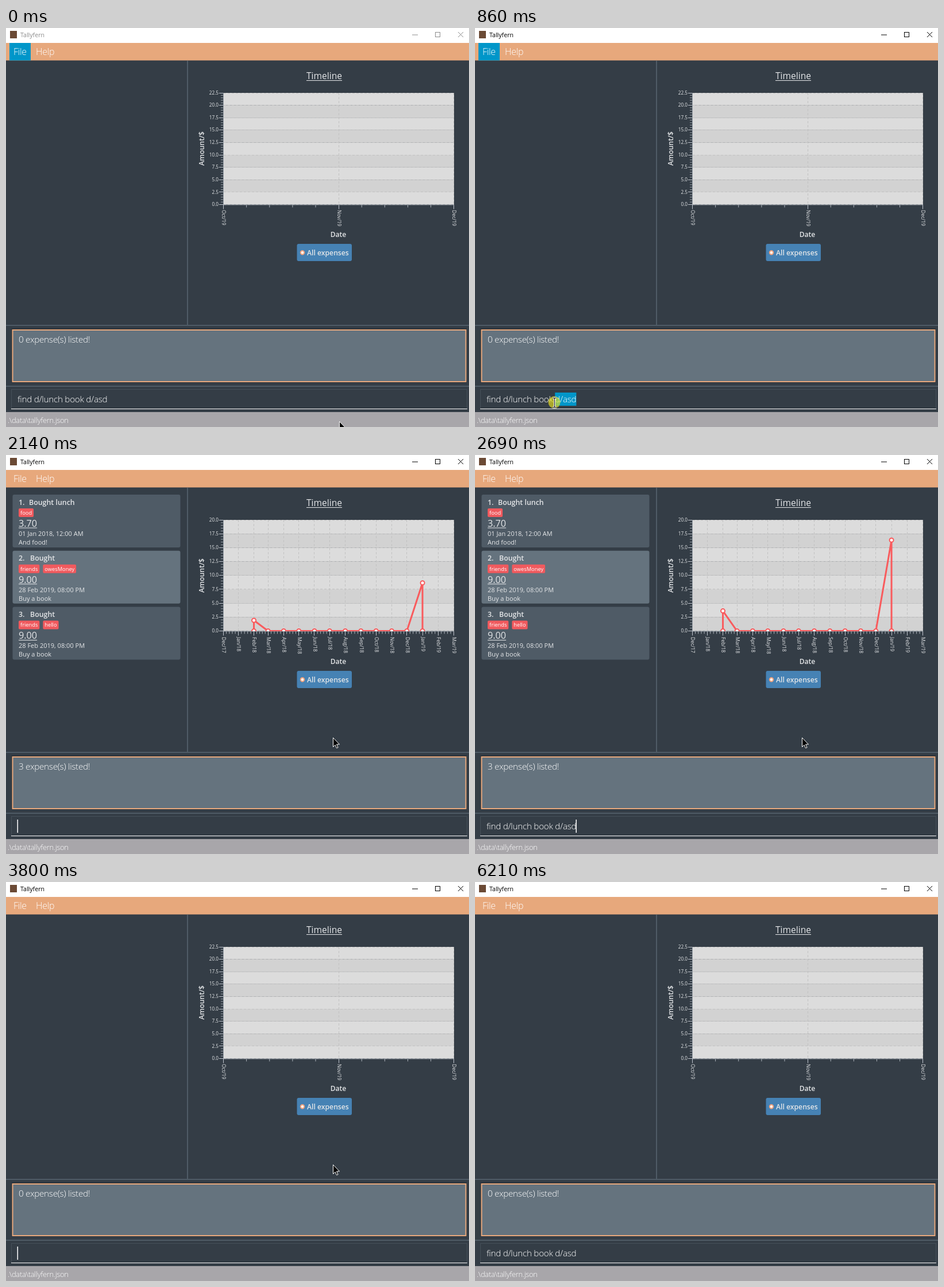
An HTML page with a canvas for the animation above (6650 ms loop, 806 px wide and 695 px high).

```html
<!DOCTYPE html>
<html lang="en">
<head>
<meta charset="utf-8">
<title>Tallyfern</title>
<style>
  html, body { margin: 0; width: 100%; height: 100%; overflow: hidden; background: #343d46; }
  canvas { display: block; }
</style>
</head>
<body>
<canvas id="stage" width="806" height="695"></canvas>
<script>
const ctx = document.getElementById('stage').getContext('2d');
const LOOP = 6650;
const STEPS = [0, 100, 207, 313, 420, 527, 633, 740, 860, 1080, 1185, 1290, 1650, 2140, 2250, 2360,
  2470, 2580, 2690, 2810, 3250, 3700, 3800, 4350, 4660, 5110, 5660, 5990, 6100, 6210];
const PATH = [[0, 580, 685], [527, 176, 652], [740, 138, 652], [975, 138, 652], [1290, 569, 492],
  [5880, 569, 492], [6100, 733, 680], [LOOP, 733, 680]];
const SHORT = 'find d/lunch book', FULL = SHORT + ' d/asd';
const INK = '#e4e6e8', DARK = '#343d46', MID = '#4f5b66', SLATE = '#65737e';
const ORANGE = '#e7a87c', RED = '#f95b5d', BLUE = '#0096c9';
const PLOT = { left: 379, right: 780, top: 113 };

function rect(x, y, w, h, color, radius = 0) {
  ctx.fillStyle = color;
  ctx.beginPath();
  ctx.roundRect(x, y, w, h, radius);
  ctx.fill();
}

function frame(x, y, w, h, color, width = 1) {
  ctx.strokeStyle = color;
  ctx.lineWidth = width;
  ctx.strokeRect(x, y, w, h);
}

function line(points, color, width = 1, dash = []) {
  ctx.strokeStyle = color;
  ctx.lineWidth = width;
  ctx.setLineDash(dash);
  ctx.beginPath();
  points.forEach(([x, y]) => ctx.lineTo(x, y));
  ctx.stroke();
  ctx.setLineDash([]);
}

function dot(x, y, r, fill, stroke, width = 2) {
  ctx.beginPath();
  ctx.arc(x, y, r, 0, 7);
  ctx.fillStyle = fill;
  ctx.fill();
  if (!stroke) return;
  ctx.strokeStyle = stroke;
  ctx.lineWidth = width;
  ctx.stroke();
}

function setFont(size, weight) {
  ctx.font = `${weight} ${size}px "Open Sans", "Noto Sans", sans-serif`;
  ctx.letterSpacing = weight === 300 ? '-0.3px' : '0px';
}

// Draws text and returns its width.
function text(str, x, y, size, { weight = 400, color = INK, align = 'left', base = 'alphabetic', turn = 0 } = {}) {
  setFont(size, weight);
  ctx.save();
  ctx.translate(x, y);
  ctx.rotate(turn * Math.PI / 2);
  ctx.textAlign = align;
  ctx.textBaseline = base;
  ctx.fillStyle = color;
  ctx.fillText(str, 0, 0);
  ctx.restore();
  return ctx.measureText(str).width;
}

function drawTitleBar(active) {
  const color = active ? '#000' : '#8c8c8c';
  rect(0, 0, 806, 26, '#fff');
  rect(7, 5, 12, 13, '#6b4a35');
  text('Tallyfern', 25, 16, 10.6, { color });
  rect(707, 11.5, 10, 1, color);
  frame(747.5, 7.5, 8, 8, color);
  line([[787, 7], [796, 16]], color);
  line([[796, 7], [787, 16]], color);
}

function drawShell(t) {
  rect(0, 0, 806, 695, DARK);
  drawTitleBar(t >= 527);
  rect(0, 26, 806, 30.5, ORANGE);
  if (t < 1080) rect(6, 26, 37, 30.5, BLUE);
  text('File', 13, 46.5, 16, { weight: 300, color: '#fff' });
  text('Help', 52, 46.5, 16, { weight: 300, color: '#fff' });

  rect(315, 57, 2, 461, MID);
  rect(0, 517, 806, 2, MID);
  rect(0, 623, 806, 2, MID);
  rect(9, 523, 793, 95, '#2d353d');
  rect(11, 525, 790, 92, SLATE);
  frame(11.5, 526, 789, 90, ORANGE, 2);
  frame(9.5, 629.5, 793, 34, '#45505a');
  rect(9, 663, 794, 1, '#fff');
  rect(0, 669, 806, 26, '#a8a6aa');
  text('.\\data\\tallyfern.json', 3, 688, 13, { weight: 300, color: '#fff' });
}

function drawCard(index, name, nameX, tags, amount, date, note) {
  const y = 69 + index * 97.7;
  rect(11.5, y, 292, 92, index % 2 ? SLATE : MID, 3);
  text(`${index + 1}.`, 22, y + 17.5, 12.4, { weight: 600 });
  text(name, nameX, y + 17.5, 12.4, { weight: 600 });
  let x = 22;
  for (const tag of tags) {
    setFont(9.3, 400);
    const width = ctx.measureText(tag).width + 6;
    rect(x, y + 24, width, 15, '#f05a5e', 2);
    text(tag, x + 3, y + 35, 9.3, { color: '#fff' });
    x += width + 6;
  }
  rect(22, y + 57.5, text(amount, 22, y + 56, 16.2), 1, INK);
  text(date, 22, y + 72, 11);
  text(note, 22, y + 87, 11);
}

function drawCards() {
  drawCard(0, 'Bought lunch', 40, ['food'], '3.70', '01 Jan 2018, 12:00 AM', 'And food!');
  drawCard(1, 'Bought', 42, ['friends', 'owesMoney'], '9.00', '28 Feb 2019, 08:00 PM', 'Buy a book');
  drawCard(2, 'Bought', 42, ['friends', 'hello'], '9.00', '28 Feb 2019, 08:00 PM', 'Buy a book');
}

// Month 0 is January 2018.
function monthTick(month) {
  const first = new Date(Date.UTC(2018, month, 1));
  const days = (first - Date.UTC(2018, 0, 1)) / 864e5;
  const name = first.toLocaleString('en-US', { month: 'short', timeZone: 'UTC' });
  const x = month < 0 ? 378.5 : month > 13 ? 779.5 : 404.3 + days * 0.8788;
  return { x, label: `${name}/${first.getUTCFullYear() % 100}` };
}

function drawAxes(rows, bottom, ticks) {
  const { left, right, top } = PLOT, step = (bottom - top) / rows, grid = '#c2c2c2';
  for (let i = 0; i < rows; i++) {
    rect(left, top + i * step, right - left, step, i % 2 ? '#d2d2d2' : '#dcdcdc');
  }
  for (let i = 0; i <= rows; i++) {
    const y = top + i * step, snapped = Math.floor(y) + 0.5;
    line([[left, snapped], [right, snapped]], grid, 1, [4, 3]);
    line([[371, snapped], [left, snapped]], '#c0c5ce');
    text(((rows - i) * 2.5).toFixed(1), 370, y + 0.5, 8.2, { align: 'right', base: 'middle' });
    for (let j = 1; j < 5 && i < rows; j++) {
      line([[374, y + j * step / 5], [left, y + j * step / 5]], '#9aa1a9');
    }
  }
  ticks.forEach(({ x, label }, i) => {
    const snapped = Math.floor(x) + 0.5;
    if (i) line([[snapped, top], [snapped, bottom]], grid, 1, [4, 3]);
    line([[snapped, bottom], [snapped, bottom + 8]], '#c0c5ce');
    text(label, x, 317, 8.5, { base: 'middle', turn: 1 });
    const next = ticks[i + 1];
    for (let j = 1; next && j < 5; j++) {
      const minor = x + (next.x - x) * j / 5;
      line([[minor, bottom], [minor, bottom + 5]], '#b0b6be');
    }
  });
  line([[378.5, top], [378.5, bottom]], '#9aa1a9');
  line([[left, bottom + 0.5], [right, bottom + 0.5]], '#9aa1a9');
}

function drawSeries(t, ticks) {
  const zero = 306.5, settled = t >= 2810;
  const grow = Math.min(1, 0.48 + 0.52 * (t - 2140) / 670);
  const first = zero - 38.5 * grow, last = zero - 174.5 * grow;
  const flat = ticks.slice(2, 14).map(({ x }) => [x, zero]);
  const points = settled
    ? [[ticks[1].x, first], ...flat, [ticks[14].x, last]]
    : [flat[0], [flat[0][0], first], ...flat.slice(1, -1), [flat[11][0], last], flat[11]];
  ctx.save();
  ctx.beginPath();
  ctx.rect(PLOT.left, PLOT.top, PLOT.right - PLOT.left, 194);
  ctx.clip();
  ctx.lineJoin = 'round';
  line(points, RED, 3);
  points.forEach(([x, y]) => dot(x, y, 3.5, '#fff', RED));
  ctx.restore();
}

function drawChart(t, hasData) {
  const width = text('Timeline', 554, 89, 15.6, { align: 'center' });
  rect(554 - width / 2, 91, width, 1, INK);
  text('Amount/$', 345, 210, 12.3, { weight: 600, align: 'center', turn: -1 });
  text('Date', 578.5, 363.5, 12.1, { weight: 600, align: 'center' });

  if (hasData) {
    const ticks = Array.from({ length: 16 }, (_, i) => monthTick(i - 1));
    drawAxes(8, 306.5, ticks);
    drawSeries(t, ticks);
  } else {
    const ticks = ['Oct/19', 'Nov/19', 'Dec/19'].map((label, i) => ({ label, x: 378.5 + i * 200.6 }));
    drawAxes(9, 307.5, ticks);
  }

  rect(506.5, 376, 95.5, 30, '#4682b4', 3);
  dot(516, 391.3, 3.2, '#fff', '#f3a27c');
  text('All expenses', 524, 395.5, 12.2, { weight: 600 });
}

function commandAt(t) {
  if (t < 1650) return FULL;
  if (t < 2140) return SHORT;
  if (t < 2580) return '';
  if (t < 2690) return SHORT;
  return t < 3800 || t >= 4660 ? FULL : '';
}

function caretVisible(t) {
  return [[1650, 3250], [3700, 4350], [4660, 5110], [5660, 6210]].some(([from, to]) => t >= from && t < to);
}

function drawCommand(t, pointer) {
  const command = commandAt(t), x = 20;
  setFont(15.3, 300);
  const end = x + ctx.measureText(command).width;
  if (t >= 527 && t < 1650) {
    const wordStart = x + ctx.measureText(SHORT + ' ').width;
    const start = t < 740 ? Math.max(wordStart, pointer.x) : wordStart;
    if (start < end) rect(start, 635, end - start, 23, BLUE);
  }
  text(command, x, 652, 15.3, { weight: 300, color: '#fff' });
  if (caretVisible(t)) rect(Math.round(end) - 0.5, 635, 1.5, 23, '#fff');
}

function pointerAt(t) {
  const i = PATH.findIndex(([time]) => time > t);
  const [t0, x0, y0] = PATH[i - 1], [t1, x1, y1] = PATH[i];
  const k = (t - t0) / (t1 - t0);
  return { x: x0 + (x1 - x0) * k, y: y0 + (y1 - y0) * k };
}

function drawPointer(t, { x, y }) {
  if (t >= 6210) return;
  const pressed = t >= 527 && t < 1080 && t !== 740;
  if (pressed) dot(x, y, 10.5, 'rgba(235, 225, 30, 0.65)');
  ctx.save();
  ctx.translate(Math.round(x), Math.round(y));
  if (y > 629 && y < 664) {
    for (const [color, width] of [['#fff', 3], ['#000', 1]]) {
      line([[0.5, -7], [0.5, 8]], color, width);
      line([[-3, -7.5], [4, -7.5]], color, width);
      line([[-3, 8.5], [4, 8.5]], color, width);
    }
  } else {
    const arrow = new Path2D('M.5 .5V16.5L4 13L6.5 18.5L9 17.5L6.5 12H11.5Z');
    ctx.fillStyle = '#000';
    ctx.fill(arrow);
    ctx.strokeStyle = '#fff';
    ctx.lineWidth = 1;
    ctx.stroke(arrow);
  }
  ctx.restore();
}

function render(now) {
  const time = now % LOOP;
  const t = STEPS.findLast(step => step <= time);
  const hasData = t >= 2140 && t < 3800;
  const pointer = pointerAt(t);
  drawShell(t);
  if (hasData) drawCards();
  drawChart(t, hasData);
  text(`${hasData ? 3 : 0} expense(s) listed!`, 22, 548, 15.3, { weight: 300, color: '#fff' });
  drawCommand(t, pointer);
  drawPointer(t, pointer);
}

const start = performance.now();
function tick() {
  render(performance.now() - start);
  requestAnimationFrame(tick);
}
tick();
</script>
</body>
</html>
```
